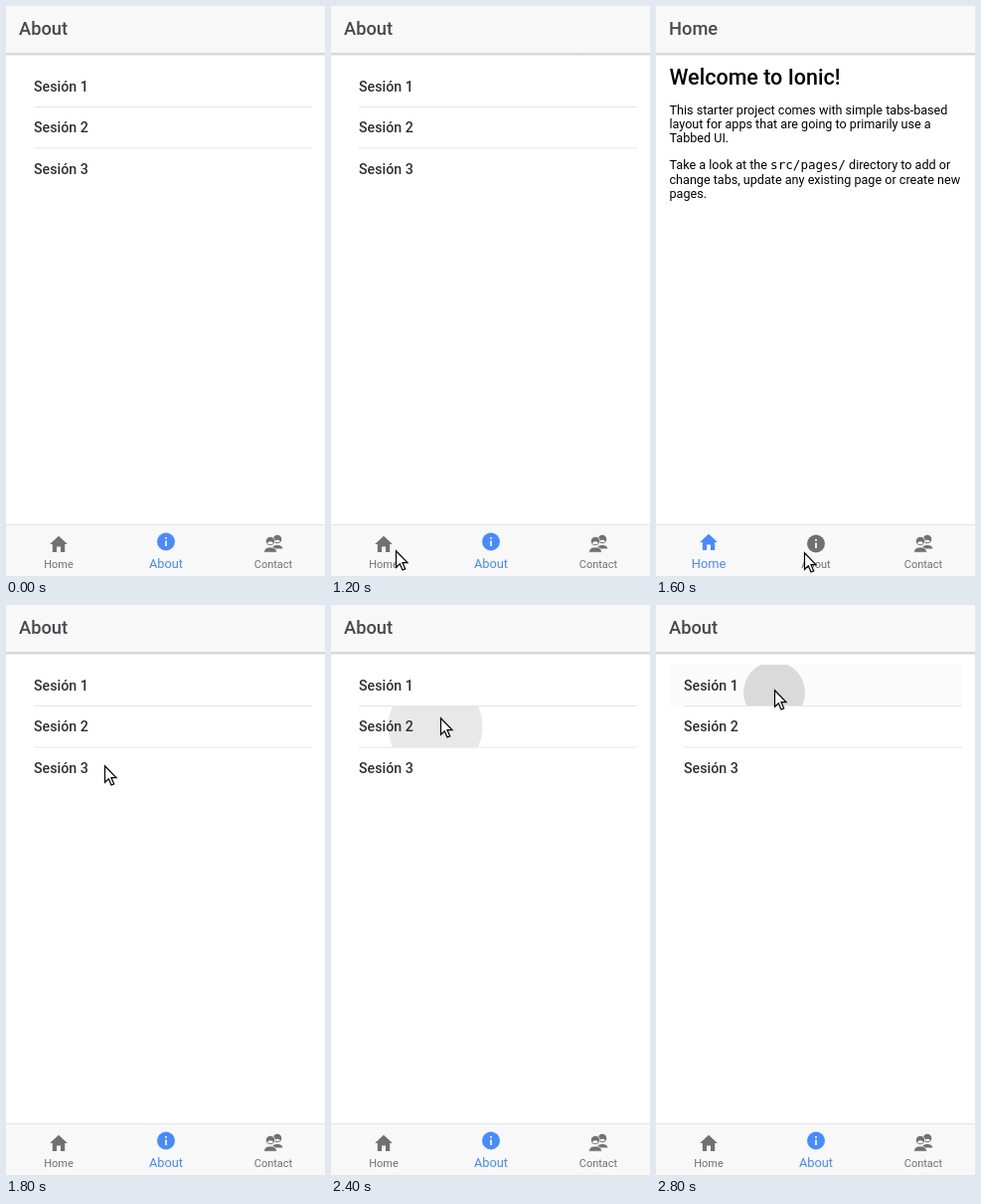
Animation, 321 px wide and 574 px high, one loop 3 s. Source, as an HTML page:

```html
<!DOCTYPE html>
<html lang="es">
<head>
<meta charset="utf-8">
<title>Tabs demo</title>
<style>
  html, body { margin: 0; width: 100%; height: 100%; overflow: hidden; background: #fff; }
  svg { display: block; width: 321px; height: 574px; font-family: Roboto, sans-serif; }
  .title { font-size: 18.3px; font-weight: 500; fill: #474a4d; }
  .item { font-size: 14.2px; font-weight: 500; fill: #303030; }
  .heading { font-size: 21.5px; font-weight: 500; }
  .body { font-size: 12.6px; }
  .code { font-family: "DejaVu Sans Mono", monospace; }
  .tab { fill: #717171; }
  .tab text { font-size: 11px; text-anchor: middle; }
  .tab.active { fill: #488aff; }
  .tab.active text { font-size: 12.8px; }
  .tab.active .icon { transform: translateY(-2px); }
  .settling .tab.active { fill: #5e93f2; }
</style>
</head>
<body>
<svg viewBox="0 0 321 574">
  <defs>
    <linearGradient id="shadow" x2="0" y2="1">
      <stop stop-color="#000" stop-opacity=".24"/>
      <stop offset="1" stop-color="#000" stop-opacity="0"/>
    </linearGradient>
    <clipPath id="rowClip"><rect id="rowBox" x="14" width="294" height="41.5"/></clipPath>
  </defs>
  <rect width="321" height="574" fill="#fff"/>
  <rect width="321" height="48" fill="#f8f8f8"/>
  <rect y="47.5" width="321" height="3" fill="url(#shadow)"/>
  <text id="title" class="title" x="13" y="28.6"></text>

  <g id="about">
    <g clip-path="url(#rowClip)">
      <rect id="rowTint" x="14" y="60" width="294" height="125" fill="#fbfbfb"/>
      <circle id="ripple"/>
    </g>
    <path d="M28 101.5H308M28 143H308" stroke="#e6e6e6"/>
    <text class="item" x="28" y="86">Sesión 1</text>
    <text class="item" x="28" y="127.3">Sesión 2</text>
    <text class="item" x="28" y="168.6">Sesión 3</text>
  </g>

  <g id="home">
    <text class="heading" x="13.5" y="79">Welcome to Ionic!</text>
    <g class="body">
      <text x="13.5" y="109">This starter project comes with simple tabs-based</text>
      <text x="13.5" y="123">layout for apps that are going to primarily use a</text>
      <text x="13.5" y="137">Tabbed UI.</text>
      <text x="13.5" y="164">Take a look at the <tspan class="code">src/pages/</tspan> directory to add or</text>
      <text x="13.5" y="178.5">change tabs, update any existing page or create new</text>
      <text x="13.5" y="193">pages.</text>
    </g>
  </g>

  <g id="tabs">
    <rect y="521" width="321" height="53" fill="#f8f8f8"/>
    <rect id="tabTint" y="522" width="107" height="51" fill="#f4f4f4"/>
    <path d="M0 521.5H321M0 573.5H321" stroke="#e6e6e6"/>
    <g class="tab" data-page="Home">
      <g class="icon"><path d="M51 549V543.500h4V549h4.200v-8h2.700L53 532.700 44.100 541h2.700v8z"/></g>
      <text x="53" y="565">Home</text>
    </g>
    <g class="tab" data-page="About">
      <g class="icon">
        <circle cx="161" cy="540.5" r="9"/>
        <path d="M160.1 536h1.8v1.8h-1.8zM160.1 539.6h1.8v5.3h-1.8z" fill="#f8f8f8"/>
      </g>
      <text x="161" y="565">About</text>
    </g>
    <g class="tab">
      <circle cx="273" cy="536" r="4.3"/>
      <path d="M268 545.5c0-3 3-3.5 5-3.5s5.300 .7 5.300 3.500z"/>
      <g stroke="#f8f8f8" stroke-width=".8">
        <circle cx="266" cy="538" r="4.6"/>
        <path d="M259.500 549.300c0-4 3.500-5.300 6.500-5.300s6.500 1.300 6.500 5.300z"/>
      </g>
      <g fill="#f8f8f8">
        <ellipse cx="266" cy="539.7" rx="2.8" ry="1.500"/>
        <ellipse cx="273.300" cy="538" rx="2.3" ry="1.300"/>
      </g>
      <text x="269" y="565">Contact</text>
    </g>
  </g>
  <path id="cursor" d="M.5 .8V17.300L4.300 13.700 7 20 9.700 18.900 7 12.700H12z" fill="#fff" stroke="#000" stroke-width="1.200"/>
</svg>
<script>
const LOOP = 3000, STEP = 200;
const $ = id => document.getElementById(id);

// Cursor tip at each step, starting at 600 ms
const pointer = [
  [203, 353], [176, 254], [92, 512], [65, 547], [120, 547], [149, 549],
  [99, 161], [102, 142], [105, 121], [110, 113], [116, 95], [119, 85]
];
const taps = [
  { start: 2200, end: 2800, row: 1, x: 105, y: 122 },
  { start: 2800, end: 3000, row: 0, x: 119, y: 88 }
];

const show = (el, visible) => el.setAttribute("visibility", visible ? "visible" : "hidden");
const set = (el, attrs) => {
  for (const name in attrs) el.setAttribute(name, attrs[name]);
};

function drawTap(time) {
  const tap = taps.find(t => time >= t.start && time < t.end);
  show($("ripple"), tap);
  show($("rowTint"), tap && time === tap.start);
  if (!tap) return;
  const age = (time - tap.start) / STEP;
  set($("rowBox"), { y: 60 + tap.row * 41.5 });
  set($("ripple"), { cx: tap.x, cy: tap.y, r: 31 + 16.5 * age, "fill-opacity": 0.135 - 0.045 * age });
}

function draw(time) {
  const page = time >= 1400 && time < 1800 ? "Home" : "About";
  $("title").textContent = page;
  $("home").style.display = page === "Home" ? "" : "none";
  $("about").style.display = page === "About" ? "" : "none";
  document.querySelectorAll(".tab").forEach(tab =>
    tab.classList.toggle("active", tab.dataset.page === page));

  const settling = time === 1400;
  $("tabs").classList.toggle("settling", settling);
  show($("tabTint"), settling);

  drawTap(time);
  const tip = pointer[time / STEP - 3];
  show($("cursor"), tip);
  if (tip) set($("cursor"), { transform: `translate(${tip})` });
}

function tick() {
  const time = performance.now() % LOOP;
  draw(Math.floor(time / STEP) * STEP);
  requestAnimationFrame(tick);
}
tick();
</script>
</body>
</html>
```
